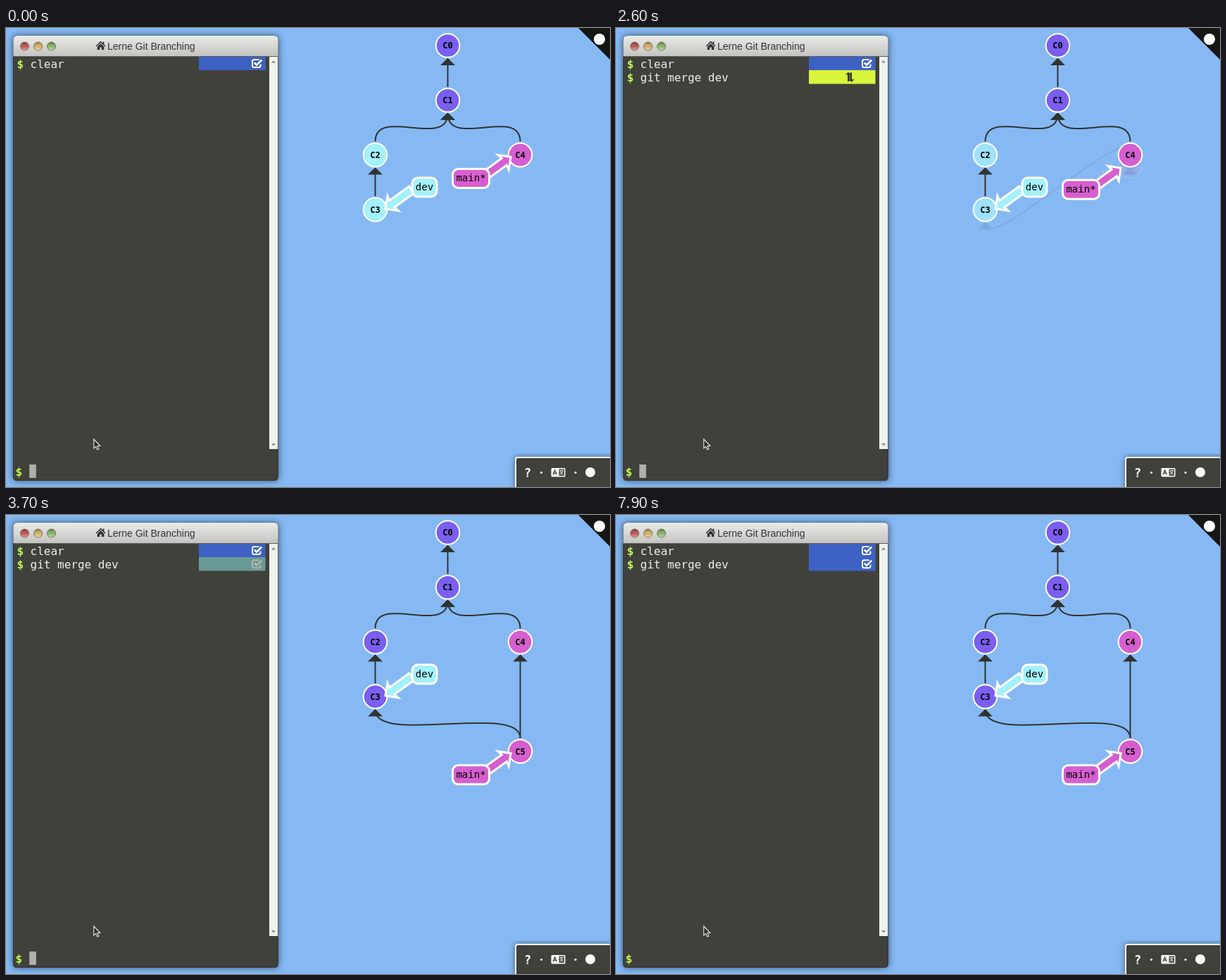
An HTML page for the animation above (8000 ms loop, 858 by 653 pixels).

```html
<!DOCTYPE html>
<html lang="de">
<head>
<meta charset="utf-8">
<title>Lerne Git Branching</title>
<style>
  html, body { margin: 0; width: 100%; height: 100%; overflow: hidden; background: #86b9f3; }
  svg { display: block; width: 100vw; height: 100vh; }
  text { white-space: pre; }
  .mono { font: 16px "DejaVu Sans Mono", monospace; fill: #f0f0ea; }
  .prompt { font: bold 16px "DejaVu Sans Mono", monospace; fill: #bdfb4d; }
  .title { font: 14px "Liberation Sans", Arial, sans-serif; fill: #333; }
  .commit text { font: bold 12px "DejaVu Sans Mono", monospace; text-anchor: middle; fill: #000; }
  .commit circle { stroke: #fff; stroke-width: 2; }
  .branch text { font: 14px "DejaVu Sans Mono", monospace; text-anchor: middle; fill: #000; }
  .branch rect, .branch path { stroke: #fff; stroke-width: 3; }
  .edge { fill: none; stroke: #2f3332; stroke-width: 2; }
  .edge .head { fill: #2f3332; }
</style>
</head>
<body>
<svg id="stage" viewBox="0 0 858 653" preserveAspectRatio="none">
  <defs>
    <linearGradient id="bar" x2="0" y2="1">
      <stop offset="0" stop-color="#ebebe9"/><stop offset="1" stop-color="#c3c3c0"/>
    </linearGradient>
    <linearGradient id="gloss" x2="0" y2="1">
      <stop offset="0" stop-color="#000" stop-opacity=".35"/>
      <stop offset=".5" stop-color="#fff" stop-opacity=".1"/>
      <stop offset="1" stop-color="#fff" stop-opacity=".5"/>
    </linearGradient>
    <filter id="blur" x="-10%" y="-10%" width="120%" height="120%"><feGaussianBlur stdDeviation="5"/></filter>
    <g id="check" fill="none" stroke="currentColor" stroke-width="2">
      <path d="M361.5 51.5V53.5Q361.5 56 359 56H352.500Q350 56 350 53.500V47.500Q350 45 352.500 45H359.500"/>
      <path d="M352.800 49.500L356 52.700L363.200 45.500" stroke-width="2.600"/>
    </g>
  </defs>

  <rect width="858" height="653" fill="#86b9f3"/>
  <g id="tree"></g>

  <!-- terminal window -->
  <rect x="10" y="11" width="377" height="633" rx="5" fill="#1c2733" opacity=".75" filter="url(#blur)"/>
  <path d="M10.500 643V17Q10.500 11 16.500 11H380.500Q386.500 11 386.500 17V639Q386.500 644 381.500 644H15.500Q10.500 644 10.500 639Z" fill="#41413c"/>
  <path d="M10.500 40V17Q10.500 11 16.500 11H380.500Q386.500 11 386.500 17V40Z" fill="url(#bar)"/>
  <path d="M10.500 40.500H386.500" stroke="#5a5a57"/>
  <path d="M10.500 41V639Q10.500 643.500 15.500 643.500H381.500Q386 643.500 386 639V599" fill="none" stroke="#2c2f31"/>
  <g id="lights"></g>
  <path d="M134.500 18.500L127.500 25.500L128.500 26.500L134.500 20.700L140.500 26.500L141.500 25.500L139.300 23.300V19.500H137.500V21.500Z
    M134.500 22L129.700 26.700V31H133.200V27.500H135.800V31H139.300V26.700Z" fill="#333"/>
  <text class="title" x="144" y="31">Lerne Git Branching</text>

  <text class="prompt" x="15.500" y="56.500">$</text>
  <text class="mono" x="34.500" y="56.500">clear</text>
  <rect x="274" y="41" width="94.500" height="19" fill="#3d62c4"/>
  <use href="#check" color="#fff"/>

  <g id="entry">
    <text class="prompt" x="15.500" y="75.500">$</text>
    <text class="mono" x="34.500" y="75.500">git merge dev</text>
    <rect id="pill" x="274" y="60" width="94.500" height="19.500"/>
    <path id="swap" d="M329 76.500V66.500H326L330 62.500L331.800 64.500V74.300H334.500M335 63V73H338.500L334.500 77L332.300 74.500V65.200H329.500" fill="#333c22"/>
    <use id="done" href="#check" y="19.200"/>
  </g>

  <rect x="374" y="41" width="12" height="558" fill="#f0f2ec"/>
  <path d="M377 49.500L380 46L383 49.500ZM377 591L380 594.500L383 591Z" fill="#8b8d89"/>

  <text class="prompt" x="13.500" y="636.500">$</text>
  <text class="mono" id="typed" x="33.200" y="636.500"></text>
  <rect id="caret" y="621" width="9.600" height="19" fill="#b0b0aa"/>
  <path d="M124.700 585V598L127.700 595.300L129.700 599.800L131.800 598.900L129.900 594.500H133.700Z" fill="#2b2b29" stroke="#e8e8e6" stroke-width="1.100"/>

  <!-- corner ribbon and toolbar -->
  <path d="M813 0H858V45Z" fill="#151513"/>
  <circle cx="843" cy="16" r="8" fill="#fff"/>
  <path d="M723 656V614Q723 610 727 610H862V656Z" fill="#1c2733" opacity=".6" filter="url(#blur)"/>
  <path d="M724 656V614Q724 611 727 611H862V656Z" fill="#41413c" stroke="#fff" stroke-width="2"/>
  <text x="741" y="638.500" text-anchor="middle" fill="#fff" font-family="DejaVu Sans Mono, monospace" font-weight="bold" font-size="17">?</text>
  <circle cx="760.500" cy="632.500" r="1.600" fill="#fff"/>
  <circle cx="809" cy="632.500" r="1.600" fill="#fff"/>
  <rect x="774.500" y="626" width="20" height="12.500" rx="1.500" fill="#fff"/>
  <path d="M785.500 627.500H793V637H785.500Z" fill="#41413c"/>
  <path d="M777 635.500L779.700 629L782.400 635.500M778 633.300H781.400" fill="none" stroke="#41413c" stroke-width="1.300"/>
  <path d="M786.500 629.800H792M789.200 628.500V630M787.300 630.500Q788.500 634 792 635.300M791.200 630.500Q790 634 786.500 635.300" fill="none" stroke="#fff"/>
  <circle cx="830" cy="632" r="7" fill="#fff"/>
</svg>

<script>
const LOOP = 8000, STEP = 100, CHAR = 9.633;
const PURPLE = [122, 95, 240], CYAN = [163, 241, 251], PINK = [214, 95, 207], BLUE = [61, 98, 196];
const QUEUED = [222, 244, 58], RUNNING = [167, 250, 77], DARK = [45, 55, 30], WHITE = [255, 255, 255];
const TYPING = [[500, 1], [600, 2], [700, 4], [1000, 6], [1100, 9], [1400, 10],
                [1800, 11], [1900, 12], [2000, 13], [2100, 0]];
const COMMAND = "git merge dev";
const MID = 627.5, LEFT = 524.5, RIGHT = 730.5;
const row = n => 25 + 77.8 * n;

const $ = id => document.getElementById(id);
const rgb = c => `rgb(${c.map(Math.round)})`;
const lerp = (a, b, p) => a + (b - a) * p;
const mix = (a, b, p) => a.map((v, i) => lerp(v, b[i], p));

function bezier(x1, y1, x2, y2) {
  const at = (a, b, s) => 3 * a * s * (1 - s) ** 2 + 3 * b * s * s * (1 - s) + s ** 3;
  return x => {
    if (x <= 0) return 0;
    if (x >= 1) return 1;
    let lo = 0, hi = 1;
    for (let i = 0; i < 24; i++) {
      const s = (lo + hi) / 2;
      if (at(x1, x2, s) < x) lo = s; else hi = s;
    }
    return at(y1, y2, lo);
  };
}
const ease = bezier(.25, .1, .25, 1);
const easeInOut = bezier(.42, 0, .58, 1);

function el(tag, attrs, parent, text) {
  const node = document.createElementNS("http://www.w3.org/2000/svg", tag);
  for (const k in attrs) node.setAttribute(k, attrs[k]);
  if (text) node.textContent = text;
  parent.appendChild(node);
  return node;
}

const tree = $("tree");

// Curve from the top of a child to the bottom of its parent
function edge(x, y, px, py) {
  const g = el("g", { class: "edge" }, tree);
  const line = el("path", {}, g);
  const tip = py + 19;
  el("path", { class: "head", d: `M${px} ${tip}l-8 8h16z` }, g);
  const place = top => {
    const tail = top - 19;
    line.setAttribute("d", `M${x} ${tail}C${x} ${tail - 50} ${px} ${tip + 50} ${px} ${tip}`);
  };
  place(y);
  return { g, place };
}

function commit(name, x, y, color) {
  const g = el("g", { class: "commit", transform: `translate(${x} ${y})` }, tree);
  const dot = el("circle", { r: 16.8, fill: rgb(color) }, g);
  el("text", { y: 4.3 }, g, name);
  return { g, dot };
}

function branch(name, x, y, w, tipX, tipY, angle, color) {
  const g = el("g", { class: "branch", fill: rgb(color) }, tree);
  el("path", {
    d: "M0 0L-13 -13L-11.500 -6H-46V6H-11.500L-13 13Z",
    transform: `translate(${tipX} ${tipY}) rotate(${angle})`
  }, g);
  el("rect", { x: x - w / 2, y: y - 13.5, width: w, height: 27, rx: 8 }, g);
  el("text", { x, y: y + 4.3 }, g, name);
  return g;
}

edge(MID, row(1), MID, row(0));
edge(LEFT, row(2), MID, row(1));
edge(RIGHT, row(2), MID, row(1));
edge(LEFT, row(3), LEFT, row(2));
const newEdges = [edge(RIGHT, row(4), LEFT, row(3)), edge(RIGHT, row(4), RIGHT, row(2))];
const merged = commit("C5", RIGHT, row(4), PINK);
commit("C0", MID, row(0), PURPLE);
commit("C1", MID, row(1), PURPLE);
const side = [commit("C2", LEFT, row(2), CYAN), commit("C3", LEFT, row(3), CYAN)];
commit("C4", RIGHT, row(2), PINK);
branch("dev", 594.5, 226.5, 35, 539, 257, 144, CYAN);
const main = branch("main*", 660.5, 214, 52, 717, 183.5, -36, PINK);

["#b9423f", "#cfa84f", "#79ad55"].forEach((c, i) => {
  const x = 26.5 + 19 * i;
  el("circle", { cx: x, cy: 26, r: 6, fill: c, stroke: "#77716a" }, $("lights"));
  el("circle", { cx: x, cy: 26, r: 5.5, fill: "url(#gloss)" }, $("lights"));
});

function drawPrompt(t) {
  let n = 0;
  for (const [at, count] of TYPING) if (t >= at) n = count;
  $("typed").textContent = COMMAND.slice(0, n);
  $("caret").setAttribute("x", 33.2 + n * CHAR);
  $("caret").style.display = t >= 7900 ? "none" : "";
}

function drawEntry(t) {
  const finished = t >= 3150;
  const running = mix(QUEUED, RUNNING, ease((Math.min(t, 3150) - 2450) / 1500));
  const p = ease((t - 3150) / 1500);
  $("entry").style.display = t >= 2100 ? "" : "none";
  $("pill").setAttribute("fill", rgb(mix(running, BLUE, p)));
  $("swap").style.display = finished ? "none" : "";
  $("done").style.display = finished ? "" : "none";
  $("done").style.color = rgb(mix(DARK, WHITE, p));
}

function drawTree(t) {
  const p = easeInOut((t - 2445) / 700);
  const y = lerp(row(2), row(4), p);
  merged.g.setAttribute("transform", `translate(${RIGHT} ${y})`);
  merged.g.setAttribute("opacity", p);
  newEdges.forEach(e => { e.place(y); e.g.setAttribute("opacity", p); });
  side.forEach(c => c.dot.setAttribute("fill", rgb(mix(CYAN, PURPLE, p))));
  main.setAttribute("transform", `translate(0 ${y - row(2)})`);
}

// The screen refreshes ten times a second
function draw(now) {
  const t = Math.floor((now % LOOP) / STEP) * STEP;
  drawPrompt(t);
  drawEntry(t);
  drawTree(t);
}

const start = performance.now();
function tick() {
  draw(performance.now() - start);
  requestAnimationFrame(tick);
}
tick();
</script>
</body>
</html>
```
